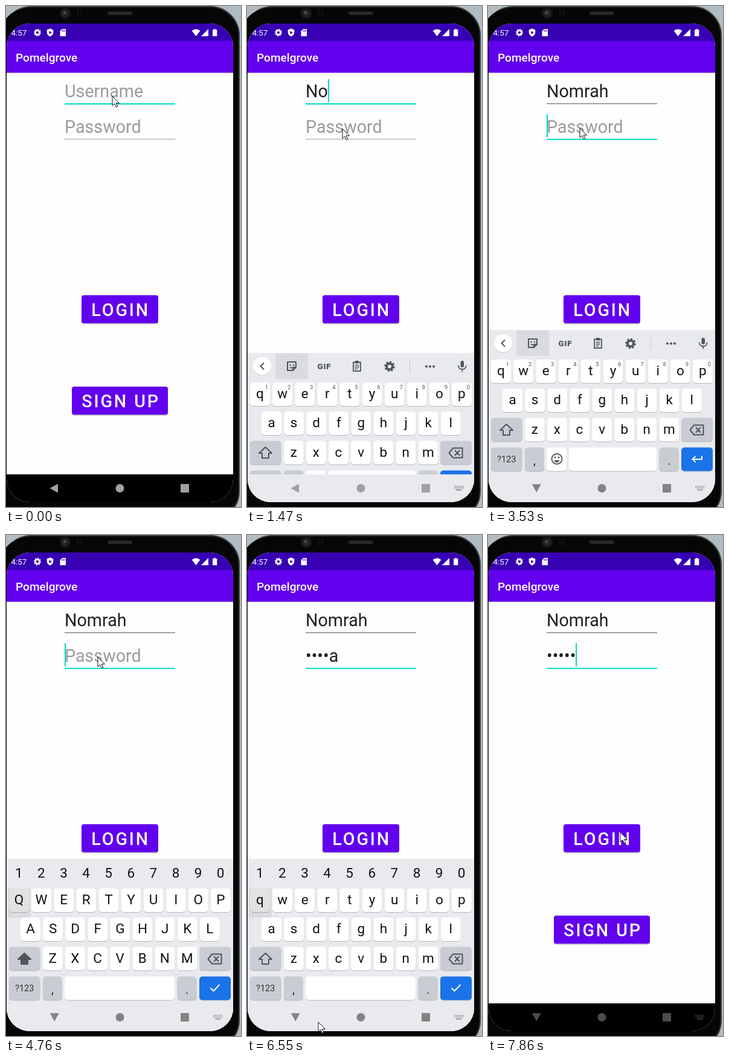
These frames come from a looping animation (389 by 829 pixels, 8 s). An HTML page:

```html
<!DOCTYPE html>
<html lang="en">
<head>
<meta charset="utf-8">
<title>Login screen</title>
<style>
html, body { margin: 0; width: 100%; height: 100%; overflow: hidden; background: #000; }
svg { display: block; font-family: Roboto, "Noto Sans", sans-serif; }
.field { font-size: 28.7px; white-space: pre; }
.btn { font-size: 28.7px; font-weight: 500; letter-spacing: 2.9px; fill: #fff; }
.key { font-size: 22.5px; text-anchor: middle; fill: #111; }
.line { fill: none; stroke-linecap: round; stroke-linejoin: round; }
</style>
</head>
<body>
<svg id="stage" width="389" height="829" viewBox="0 0 389 829"></svg>
<script>
const LOOP = 8000;
const TEAL = '#03dac5', PANEL = '#e8eaed', GREY_KEY = '#c9ccd3', INK = '#50555a';
const stage = document.getElementById('stage');
const $ = id => document.getElementById(id);

const rect = (x, y, w, h, fill, r = 0, more = '') =>
  `<rect x="${x}" y="${y}" width="${w}" height="${h}" rx="${r}" fill="${fill}" ${more}/>`;
const circle = (x, y, r, fill, more = '') => `<circle cx="${x}" cy="${y}" r="${r}" fill="${fill}" ${more}/>`;
const shape = (d, fill, more = '') => `<path d="${d}" fill="${fill}" ${more}/>`;
const line = (d, color, w = 2) => `<path class="line" d="${d}" stroke="${color}" stroke-width="${w}"/>`;
const text = (x, y, s, more = '') => `<text x="${x}" y="${y}" ${more}>${s}</text>`;
const group = (id, body, more = '') => `<g id="${id}" ${more}>${body}</g>`;

const gear = (x, y, r, color) =>
  circle(x, y, r * 0.58, 'none', `stroke="${color}" stroke-width="${r * 0.44}"`) +
  circle(x, y, r * 0.88, 'none', `stroke="${color}" stroke-width="${r * 0.3}" pathLength="16" stroke-dasharray="1.1 0.9"`);

function device() {
  return rect(0, 0, 389, 829, '#b0bcc2') +
    rect(-6, 1, 392, 850, '#0a0a0a', 48, 'stroke="#3b3d3f" stroke-width="2"') +
    rect(-10, 4, 393, 842, '#060606', 45) +
    circle(98, 12, 9.5, '#151618') + circle(98, 12, 6, '#22252a') + circle(97, 11, 2.3, '#4b5058') +
    line('M119 6V18M125 6V18M119 12H125', '#17181a', 1.5) +
    rect(168, 9, 41, 6, '#242527', 3) +
    line('M172 12H206', '#34363a', 1);
}

function statusBar() {
  return rect(1, 29, 375, 29, '#3700b3') +
    text(8.5, 48.7, '4:57', 'font-size="13.4" fill="#fff"') +
    gear(52, 44, 6, '#fff') +
    shape('M73 37.3L78.3 39.5V43.5Q78 48.3 73 50.6Q68 48.3 67.7 43.5V39.5Z', '#fff') +
    shape('M71.4 41.2L76 44L71.4 46.8Z', '#3700b3') +
    shape('M93 38H99V50H89.5V41.5Z', '#fff') +
    line('M93 40V42.2M95 40V42.2M97 40V42.2', '#3700b3', 1) +
    shape('M307.6 41Q314.5 35.5 321.4 41L314.5 50Z', '#fff') +
    shape('M335 38V50H323Z', '#fff') +
    shape('M342 39.3H344V38H347.3V39.3H349.3V50H342Z', '#fff');
}

const button = (x, y, w, label) =>
  rect(x, y + 1.5, w, 47, '#000', 4, 'opacity=".18"') + rect(x, y, w, 46.5, '#6200ee', 4) +
  text(x + 16.2, y + 34.4, label, 'class="btn"');

function page() {
  return rect(1, 29, 375, 792, '#fefefe') +
    button(125, 478.5, 127, 'LOGIN') + button(109, 629.8, 159, 'SIGN UP') +
    rect(1, 58, 375, 52.5, '#6200ee') + statusBar() +
    text(16, 92, 'Pomelgrove', 'font-size="19.1" font-weight="500" fill="#fff"') +
    '<rect id="userLine" x="97"/><rect id="passLine" x="97"/>' +
    text(97, 151.2, '', 'id="user" class="field"') +
    text(97, 209.8, '', 'id="pass" class="field"') +
    rect(97, 121, 2, 38.5, TEAL, 0, 'id="caret"');
}

const PITCH = 37.1;
const keyBox = (x, y, w, fill = '#fff') => rect(x, y + 1, w, 39, '#b4b7bb', 5) + rect(x, y, w, 39, fill, 5);

function letterRow(letters, x, y) {
  return [...letters].map((c, i) => {
    const left = x + i * PITCH;
    return keyBox(left, y, 33) + text(left + 16.5, y + 26, c, 'class="key letter"');
  }).join('');
}

function toolStrip() {
  return rect(47, 537, 54, 42, '#d9dbde') +
    circle(25, 559, 15, '#c9cbcf') + circle(25, 558, 15, '#fff') +
    line('M27.5 553L22.5 558L27.5 563', INK) +
    line('M67 551H81V560L76 565H67ZM76 565V560H81', INK, 2) +
    circle(71.5, 556, 1.2, INK) + circle(77, 556, 1.2, INK) + line('M71 560Q73 562 75 560', INK, 1.3) +
    text(128, 563, 'GIF', `font-size="13.5" font-weight="900" letter-spacing=".8" text-anchor="middle" fill="${INK}"`) +
    line('M176 551.5H188V566H176Z', INK, 1.8) + rect(179, 549, 6, 4.5, INK, 1) +
    line('M179 556.5H185M179 559.5H185M179 562.5H183', INK, 1.3) +
    gear(236, 558.5, 8.5, INK) + rect(269, 548, 1, 21, '#c4c7ca') +
    [297, 303, 309].map(x => circle(x, 558.5, 2, INK)).join('') +
    rect(353.5, 549, 5.5, 11, INK, 2.7) + line('M350 557.5Q350.5 563 356.2 563Q362 563 362.5 557.5M356.2 563V566.5', INK, 1.8);
}

function keyboard() {
  const perDigit = make => [...'1234567890'].map((d, i) => make(d, i * PITCH)).join('');
  const small = perDigit((d, x) => text(x + 32.5, 595.5, d, 'font-size="9.5" text-anchor="middle" fill="#555"'));
  const large = perDigit((d, x) => text(x + 21.3, 567.3, d, 'class="key"'));
  const smile = circle(114, 749.5, 8.5, 'none', `stroke="${INK}" stroke-width="1.8"`) +
    circle(111, 747, 1.4, INK) + circle(117, 747, 1.4, INK) +
    shape('M109.5 751.5H118.5Q117 755.5 114 755.5Q111 755.5 109.5 751.5Z', INK);
  return rect(1, 536, 375, 290, PANEL) +
    letterRow('qwertyuiop', 5, 585) + letterRow('asdfghjkl', 24, 633) + letterRow('zxcvbnm', 60.8, 681.5) +
    keyBox(5, 681.5, 51.5, GREY_KEY) +
    `<path id="shift" d="M30.5 692L41 702H36V710H25V702H20Z" stroke="${INK}" stroke-width="2" stroke-linejoin="round"/>` +
    keyBox(320, 681.5, 52, GREY_KEY) +
    line('M341 693.5H356.5V709.5H341L334.5 701.5ZM344.5 697.8L351.5 705.2M351.5 697.8L344.5 705.2', INK, 2) +
    keyBox(5, 730.5, 51.5, GREY_KEY) + text(30.7, 755, '?123', 'font-size="14.5" text-anchor="middle" fill="#333"') +
    keyBox(61, 730.5, 32, GREY_KEY) + text(77, 758.5, ',', 'class="key" style="font-size:19px"') +
    keyBox(283.5, 730.5, 32, GREY_KEY) + text(299.5, 758.5, '.', 'class="key" style="font-size:19px"') +
    keyBox(320, 730.5, 52, '#1a73e8') +
    group('textMode', toolStrip() + small + keyBox(97, 730.5, 33) + smile + keyBox(134, 730.5, 145) +
      line('M354 745V750H339M343 745.5L338.5 750L343 754.5', '#fff', 2)) +
    group('passMode', large + keyBox(97, 730.5, 182) + line('M339 750L343.5 754.5L353 744.5', '#fff', 2) +
      rect(3, 585, 37.5, 48, '#000', 0, 'opacity=".065"') + rect(5, 585, 33, 39, '#000', 5, 'opacity=".05"'));
}

function navBar() {
  let dots = '';
  for (let r = 0; r < 2; r++) {
    for (let c = 0; c < 6; c++) dots += `<rect x="${343 + c * 2.7}" y="${794 + r * 2.7}" width="1.6" height="1.6"/>`;
  }
  return '<rect id="navBack" x="1" y="775" width="375" height="47"/>' +
    group('navIcons', '<path id="back" d="M72.5 798L86 790.5V805.5Z"/><circle cx="188.5" cy="798" r="7"/>' +
      '<rect x="289" y="791" width="14" height="14" rx="1"/>') +
    group('imeIcon', dots + '<rect x="346" y="799.8" width="9.5" height="1.7"/>');
}

stage.innerHTML = `<defs><clipPath id="screen">${rect(1, 29, 375, 792, '#fff', 38)}</clipPath></defs>` +
  device() + group('view', page() + group('board', keyboard()) + navBar(), 'clip-path="url(#screen)"') +
  group('mouse', shape('M0 0V16L3.8 12.6L6.3 18.3L8.8 17.2L6.3 11.7H11.5Z', '#fff',
    'stroke="#111" stroke-width="1" stroke-linejoin="round"'));

// Each track is a list of [start time, value...] that holds until the next entry.
const TRACKS = {
  user: [[0, ''], [670, 'N'], [1470, 'No'], [2420, 'Nom'], [2580, 'Nomr'], [2720, 'Nomra'], [2970, 'Nomrah']],
  pass: [[0, ''], [4900, 'N'], [5150, '•o'], [5300, '••m'], [5580, '•••r'], [5710, '••••a'], [7150, '•••••']],
  caret: [[0, 0], [150, 1], [3910, 0], [4760, 1], [6190, 0], [6670, 1], [7460, 0], [7710, 1]],
  drop: [[0, 300], [1350, 150], [1470, 38], [1590, 0], [7590, 130], [7710, 300]],
  navBack: [[0, '#000'], [1350, PANEL], [7710, '#000']],
  icons: [[0, '#a0a0a0'], [1740, '#969696'], [1860, '#8c8c8c'], [1980, '#838383'], [7710, '#4c4c4c']],
  ime: [[0, 'none'], [790, '#858585'], [1980, '#909090'], [7710, '#4c4c4c']],
  turn: [[0, 0], [2420, -50], [2580, -90]],
  mouse: [[0, 176, 149], [790, 179, 175], [1220, 180, 184], [1350, 171, 192], [1470, 158, 203], [1740, 152, 202],
    [5300, 190, 262], [5430, 225, 340], [5580, 224, 432], [5710, 219, 520], [5830, 210, 600], [5950, 201, 672],
    [6070, 195, 728], [6190, 192, 764], [6310, 190, 783], [6430, 158, 800], [6550, 118, 806], [6670, 90, 802],
    [6790, 80, 797], [6910, 83, 790], [7030, 134, 680], [7150, 194, 540], [7300, 216, 482], [7460, 216, 476],
    [7590, 216, 485], [7710, 216, 491], [7860, 219, 492]]
};

function at(name, t) {
  const track = TRACKS[name];
  let i = track.length - 1;
  while (track[i][0] > t) i--;
  return track[i].slice(1);
}

function set(id, attrs) {
  for (const k in attrs) $(id).setAttribute(k, attrs[k]);
}

function setField(id, value, hint) {
  $(id).textContent = value || hint;
  set(id, { fill: value ? '#202020' : '#9b9b9b' });
}

function setLine(id, y, active, idle) {
  set(id, { y, width: 183, height: active ? 2 : 1.3, fill: active ? TEAL : idle });
}

const letters = [...document.querySelectorAll('.letter')];
for (const el of letters) el.dataset.c = el.textContent;

function draw(t) {
  const [user] = at('user', t), [pass] = at('pass', t);
  const inPass = t >= 3530, masked = t >= 4070, upper = t >= 4370 && t < 5030;
  setField('user', user, 'Username');
  setField('pass', pass, 'Password');
  setLine('userLine', 161, !inPass, '#777');
  setLine('passLine', 219.7, t >= 3250, '#b2b2b2');

  const typed = inPass ? pass : user;
  const width = typed ? $(inPass ? 'pass' : 'user').getComputedTextLength() : 0;
  set('caret', { x: Math.round(97 + width), y: inPass ? 179 : 121, opacity: at('caret', t)[0] });

  const [drop] = at('drop', t);
  set('board', { transform: `translate(0 ${drop})`, visibility: drop < 300 ? 'visible' : 'hidden' });
  set('textMode', { display: masked ? 'none' : 'inline' });
  set('passMode', { display: masked ? 'inline' : 'none' });
  set('shift', { fill: upper ? INK : 'none' });
  for (const el of letters) el.textContent = upper ? el.dataset.c.toUpperCase() : el.dataset.c;

  set('navBack', { fill: at('navBack', t)[0] });
  set('navIcons', { fill: at('icons', t)[0] });
  set('imeIcon', { fill: at('ime', t)[0] });
  set('back', { transform: `rotate(${at('turn', t)[0]} 79.75 797.5)` });
  set('mouse', { transform: `translate(${at('mouse', t).join(' ')})` });
}

const start = performance.now();
function tick() {
  draw((performance.now() - start) % LOOP);
  requestAnimationFrame(tick);
}
tick();
</script>
</body>
</html>
```
